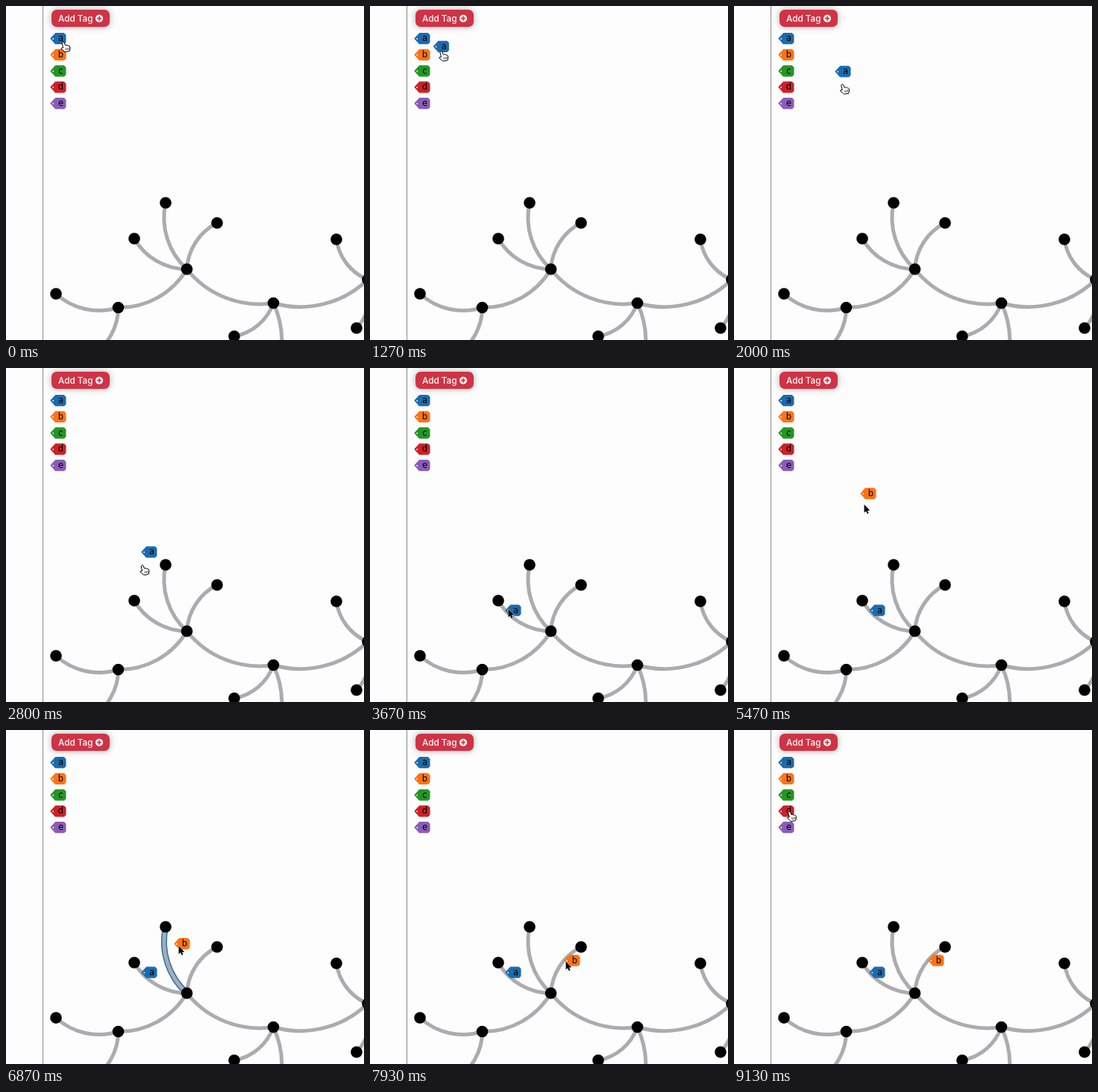
An HTML page that plays this animation: 480 px wide and 448 px high, repeating every 9190 ms.

```html
<!DOCTYPE html>
<html lang="en">
<head>
<meta charset="utf-8">
<title>Tagging edges</title>
<style>
html, body { margin: 0; width: 100%; height: 100%; overflow: hidden; background: #fefdfe; }
svg { display: block; }
text { font: 11.5px "DejaVu Sans", sans-serif; text-anchor: middle; }
#button rect { fill: #cf3345; filter: drop-shadow(0 0 4px #0005); }
#button text { font: 500 11.7px Inter, sans-serif; fill: #fff; text-anchor: start; }
.edge, .glow { fill: none; stroke: #acabad; stroke-width: 5; }
.glow { stroke: #1f77b4; stroke-width: 8; }
</style>
</head>
<body>
<svg id="stage" width="480" height="448" viewBox="0 0 480 448">
  <path d="M49.5 0V448" stroke="#8c8c8c"/>
  <g id="button">
    <rect x="61" y="5" width="78" height="23" rx="7"/>
    <text x="70" y="21">Add Tag</text>
    <circle cx="125" cy="16.7" r="5" fill="#fff"/>
    <path d="M122 16.7h6M125 13.7v6" stroke="#cf3345" stroke-width="1.7"/>
  </g>
</svg>
<script>
const stage = document.getElementById('stage');

function add(name, attrs, parent = stage) {
  const el = document.createElementNS('http://www.w3.org/2000/svg', name);
  for (const k in attrs) el.setAttribute(k, attrs[k]);
  return parent.appendChild(el);
}
const place = (el, [x, y]) => el.setAttribute('transform', `translate(${x} ${y})`);
const show = (el, on) => el.setAttribute('visibility', on ? 'visible' : 'hidden');

// Tree nodes: x, y, index of the parent
const nodes = [
  [485, 367], [358.5, 398.5, 0], [242.5, 353, 1],
  [214, 264, 2], [283, 291, 2], [172, 312, 2], [150.5, 404.5, 2],
  [67, 386, 6], [113, 469.5, 6], [306, 443, 1], [348, 519, 1],
  [443, 313, 0], [470, 432, 0]
];

// Each edge is an arc whose radius equals its chord
const glows = nodes.map(([x, y, parent]) => {
  if (parent === undefined) return null;
  const [px, py] = nodes[parent], r = Math.hypot(x - px, y - py);
  const d = `M${x} ${y}A${r} ${r} 0 0 0 ${px} ${py}`;
  const glow = add('path', { class: 'glow', d });
  add('path', { class: 'edge', d });
  return glow;
});
for (const [cx, cy] of nodes) add('circle', { cx, cy, r: 7.8 });

// Tags are positioned by the centre of their letter
const colors = { a: '#1c6bae', b: '#ff7414', c: '#249624', d: '#ce2027', e: '#8a5db5' };
const home = letter => [73.5, 43.5 + 21.75 * Object.keys(colors).indexOf(letter)];

function tag(letter) {
  const g = add('g', {}), fill = colors[letter];
  add('path', {
    d: 'M-13 .2L-7-6.4H4L6-4.4V4.8L4 6.8H-7Z',
    fill, stroke: fill, 'stroke-width': 2, 'stroke-linejoin': 'round'
  }, g);
  add('circle', { cx: -10.3, cy: .5, r: .9, fill: '#fff' }, g);
  add('text', { y: 3.6 }, g).textContent = letter;
  place(g, home(letter));
  return g;
}
Object.keys(colors).forEach(tag);

const drags = [
  { letter: 'a', from: 1000, to: 3600, drop: [195.5, 325] },
  { letter: 'b', from: 4700, to: 7870, drop: [274.5, 309] }
];
for (const drag of drags) drag.el = tag(drag.letter);

// Edges lit while a tag hovers over them
const hovers = [
  { node: 5, from: 3070, to: 3600 },
  { node: 3, from: 6130, to: 7070 },
  { node: 4, from: 7130, to: 7870 }
];

const hand = add('g', {});
add('path', {
  d: 'M-2 1.5Q-.5-.8 1 1L2.6 4.8Q4 3.8 5 5Q6.3 4.2 7 5.5Q8.4 5.2 8.8 7Q9.4 10 8 12.6L2 13.6Q0 11.5-3 9.5Q-3.3 7.6-.3 8Z',
  fill: '#fff', stroke: '#000', 'stroke-linejoin': 'round'
}, hand);
add('path', { d: 'M3 8.5l.7 3M5 8l.6 3M7 7.7l.3 3', stroke: '#000', 'stroke-width': .7 }, hand);
const arrow = add('path', {
  d: 'M0 0V11L2.5 8.8 4.2 12.5 6 11.7 4.4 8.1H7.8Z', stroke: '#fff', 'paint-order': 'stroke'
});

// Cursor moves: start, end, x, y, easing; it rests in between
const linear = p => p, smooth = p => p * p * (3 - 2 * p);
const moves = [
  [1000, 1930, 141.5, 90.5], [1930, 2730, 187.5, 249.5], [2730, 2800, 183, 264], [2800, 3270, 187.5, 328],
  [3600, 4480, 76, 66, smooth],
  [4700, 5400, 175.5, 171], [5400, 5470, 174.5, 183], [5470, 6330, 227, 286],
  [6530, 6800, 231.5, 289.5], [6870, 7400, 264, 312],
  [7870, 9060, 74.5, 109, smooth]
];

function cursor(t) {
  let pos = [77, 48];
  for (const [start, end, x, y, ease = linear] of moves) {
    if (t < start) break;
    const p = ease(Math.min(1, (t - start) / (end - start)));
    pos = [pos[0] + (x - pos[0]) * p, pos[1] + (y - pos[1]) * p];
  }
  return pos;
}

// A dragged tag trails the cursor a little and snaps onto its edge
const lag = 70;
function tagPos({ to, drop }, t) {
  if (t >= to) return drop;
  const [x, y] = cursor(t - lag);
  return [x + 8, y - 3];
}

function draw(t) {
  const tip = cursor(t);
  const pointing = t < drags[0].to || tip[0] < 84;
  place(hand, tip);
  place(arrow, tip);
  show(hand, pointing);
  show(arrow, !pointing);

  for (const drag of drags) {
    show(drag.el, t >= drag.from + lag);
    place(drag.el, tagPos(drag, t));
  }
  for (const glow of glows) if (glow) show(glow, false);
  for (const { node, from, to } of hovers) if (t >= from && t < to) show(glows[node], true);
}

const start = performance.now();
function tick() {
  draw((performance.now() - start) % 9190);
  requestAnimationFrame(tick);
}
tick();
</script>
</body>
</html>
```
